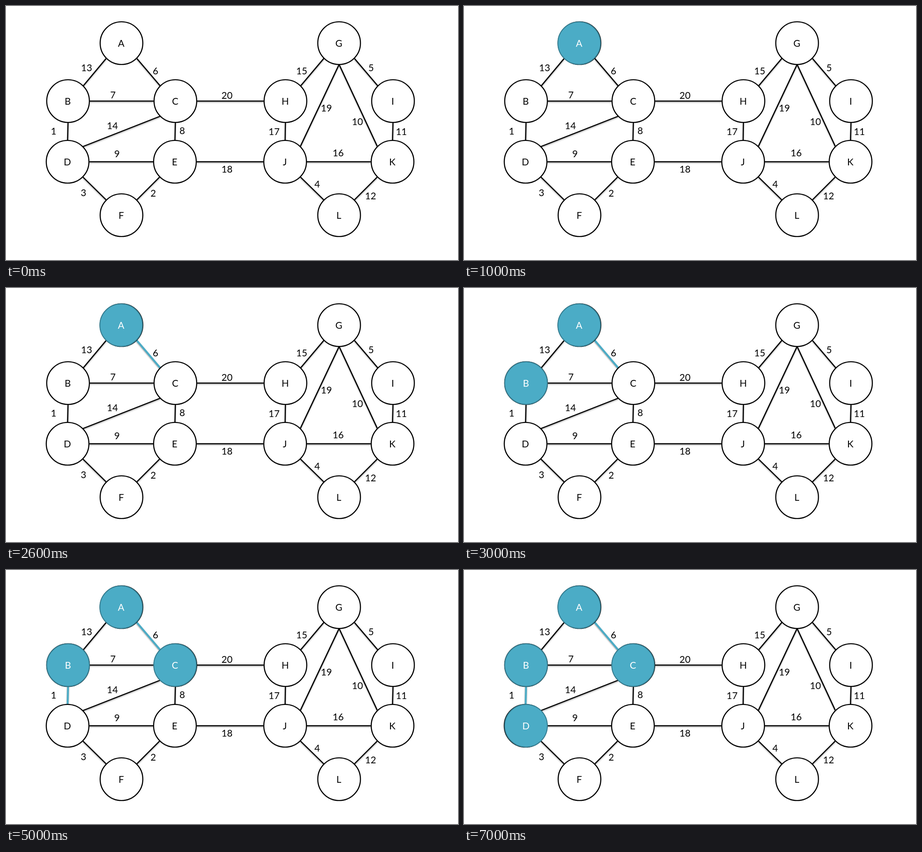
Write an HTML page with a canvas that moves like this. It is 998 by 561 pixels and loops after 8 s.

```html
<!DOCTYPE html>
<html lang="en">
<head>
<meta charset="utf-8">
<title>Minimum spanning tree</title>
<style>
html, body { margin: 0; width: 100%; height: 100%; overflow: hidden; background: #fff; }
canvas { display: block; }
</style>
</head>
<body>
<canvas id="stage" width="998" height="561"></canvas>
<script>
const ctx = document.getElementById('stage').getContext('2d');
const LOOP = 8000, R = 47.1, DIAG = 33.4;
const TEAL = '#4bacc6', RIM = '#357d91';

const nodes = {
  A: [255, 82], B: [137, 210], C: [374, 210], D: [136, 344], E: [373, 344], F: [255, 462],
  G: [735.5, 82], H: [617, 210], I: [854.5, 210], J: [616.3, 344], K: [853.5, 344], L: [735.5, 462]
};

// from, side, to, side, weight, label position
const edges = [
  ['A', 'sw', 'B', 'ne', 13, 178, 136], ['A', 'se', 'C', 'nw', 6, 330, 143],
  ['B', 'e', 'C', 'w', 7, 236, 196], ['D', 'ne', 'C', 'sw', 14, 235, 264],
  ['B', 's', 'D', 'n', 1, 105, 276], ['C', 's', 'E', 'n', 8, 389, 275],
  ['D', 'e', 'E', 'w', 9, 245, 326], ['D', 'se', 'F', 'nw', 3, 171, 412],
  ['E', 'sw', 'F', 'ne', 2, 325, 413], ['C', 'e', 'H', 'w', 20, 488, 197],
  ['E', 'e', 'J', 'w', 18, 488, 360], ['G', 'sw', 'H', 'ne', 15, 653, 143],
  ['G', 'se', 'I', 'nw', 5, 806, 136], ['H', 's', 'J', 'n', 17, 592, 277],
  ['G', 's', 'J', 'ne', 19, 707.5, 225], ['G', 's', 'K', 'nw', 10, 776, 255],
  ['I', 's', 'K', 'n', 11, 873, 277], ['J', 'e', 'K', 'w', 16, 733.5, 324],
  ['J', 'se', 'L', 'nw', 4, 687, 393], ['K', 'sw', 'L', 'ne', 12, 805, 419]
];

// When each node or edge is picked, in ms
const picked = { A: 1000, AC: 2000, B: 3000, BD: 4000, C: 5000, D: 7000 };
// Filled discs sit slightly off the outlines beneath them
const shift = { A: -0.7, B: 0, C: -0.7, D: 1 };

function anchor(id, side) {
  const d = side.length > 1 ? DIAG : R;
  const dx = side.includes('e') - side.includes('w');
  const dy = side.includes('s') - side.includes('n');
  return [nodes[id][0] + dx * d, nodes[id][1] + dy * d];
}

function text(str, x, y, color = '#000') {
  ctx.fillStyle = color;
  ctx.fillText(str, x, y + 7.6);
}

function disc(x, y, fill, stroke, width) {
  ctx.beginPath();
  ctx.arc(x, y, R, 0, Math.PI * 2);
  ctx.fillStyle = fill;
  ctx.fill();
  ctx.strokeStyle = stroke;
  ctx.lineWidth = width;
  ctx.stroke();
}

function drawEdge([a, sideA, b, sideB], isOn) {
  const on = isOn(a + b);
  ctx.save();
  ctx.shadowColor = 'rgba(0,0,0,0.38)';
  ctx.shadowBlur = 3;
  ctx.shadowOffsetY = 1.7;
  ctx.beginPath();
  ctx.moveTo(...anchor(a, sideA));
  ctx.lineTo(...anchor(b, sideB));
  ctx.strokeStyle = on ? TEAL : '#000';
  ctx.lineWidth = on ? 4.2 : 2.5;
  ctx.stroke();
  ctx.restore();
}

function drawNode(id, isOn) {
  const [x, y] = nodes[id];
  disc(x, y, '#fff', '#000', 2.4);
  if (!isOn(id)) return text(id, x - 0.6, y);
  disc(x + shift[id], y, TEAL, RIM, 2);
  text(id, x + shift[id] - 0.3, y, '#fff');
}

function render(t) {
  const isOn = key => t >= picked[key];
  ctx.fillStyle = '#fff';
  ctx.fillRect(0, 0, 998, 561);
  ctx.textAlign = 'center';
  ctx.font = '21px Lato, "Open Sans", sans-serif';
  edges.forEach(e => drawEdge(e, isOn));
  Object.keys(nodes).forEach(id => drawNode(id, isOn));
  edges.forEach(([, , , , weight, x, y]) => text(weight, x, y));
}

let start;
function tick(now) {
  start ??= now;
  render((now - start) % LOOP);
  requestAnimationFrame(tick);
}
render(0);
requestAnimationFrame(tick);
</script>
</body>
</html>
```
